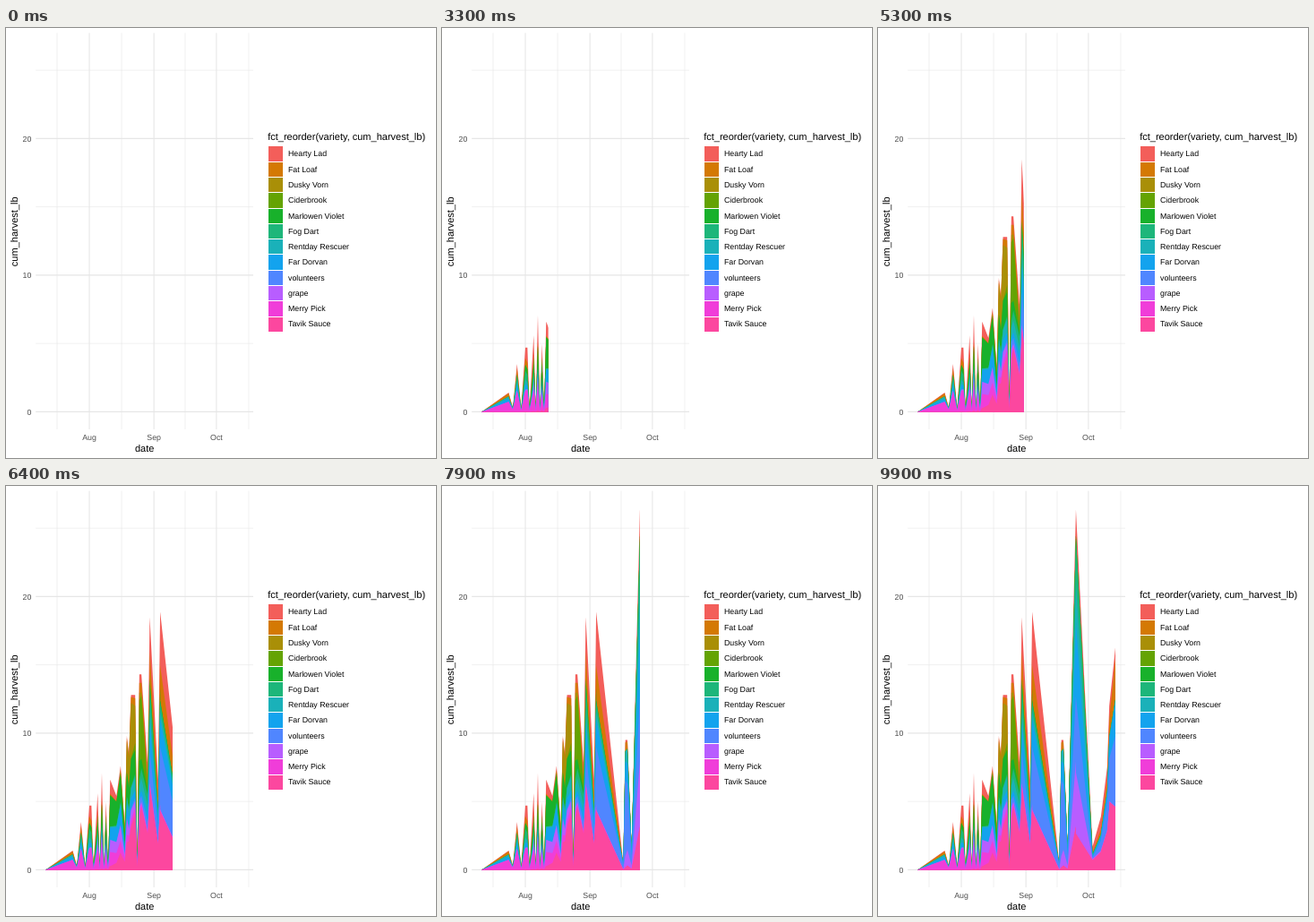
Animation of 480 by 480 pixels, one loop 10000 ms. Source, as an HTML page with a canvas:

```html
<!DOCTYPE html>
<html lang="en">
<head>
<meta charset="utf-8">
<title>Cumulative harvest</title>
<style>
  html, body { margin: 0; width: 100%; height: 100%; overflow: hidden; background: #fff; }
  canvas, svg { position: absolute; left: 0; top: 0; width: 480px; height: 480px; }
  text {
    font-family: "Liberation Sans", Arial, sans-serif; font-size: 11px; fill: #000;
    text-rendering: geometricPrecision;
  }
  .tick { font-size: 8.8px; fill: #4d4d4d; }
  .key { font-size: 8.8px; }
  .mid { text-anchor: middle; }
  .end { text-anchor: end; }
</style>
</head>
<body>
<canvas id="plot"></canvas>
<svg id="labels" viewBox="0 0 480 480"></svg>
<script>
const SIZE = 480, STEP = 100, STEPS = 100, DAYS = 95, NEVER = 999;
const PANEL = { left: 33.2, right: 276, top: 5.5, bottom: 448 };
const BASE = 429;
const px = day => 44.2 + day * 2.3255;
const py = lb => 428.4 - lb * 15.25;
const keyTop = i => Math.round(132.45 + i * 17.28);

// Top of the stack first: name, colour, weight, first peak day, spread, days until the next peak
const KINDS = [
  ['Hearty Lad', '#f35e5a', .2, 25, 8, 30],
  ['Fat Loaf', '#d47904', .13, 13, 12, 42],
  ['Dusky Vorn', '#a98f07', .3, 41, 3, NEVER],
  ['Ciderbrook', '#64a303', .35, 46, 2, NEVER],
  ['Marlowen Violet', '#18b12b', .22, 34, 11, NEVER],
  ['Fog Dart', '#1db67a', .12, 21, 5, 29],
  ['Rentday Rescuer', '#1ab1b9', .07, 16, 10, 30],
  ['Far Dorvan', '#13a3ee', .13, 15, 8, 20],
  ['volunteers', '#5086ff', .4, 64, 12, 36],
  ['grape', '#b85dff', .1, 34, 9, 42],
  ['Merry Pick', '#f03dd9', .6, 0, 25, NEVER],
  ['Tavik Sauce', '#fc479f', .35, 48, 11, 41]
];

// Each burst climbs from a low to a crest: start day, crest day, crest, low, days held
const BURSTS = [
  [0, 13, 1.4, 0],
  [15, 17, 3.5],
  [19, 21, 4.7, .3, 1],
  [23, 25, 5.6],
  [26, 27, 7.1],
  [28, 29, 5],
  [30, 31, 6.6],
  [34, 36, 7.6, 5.4],
  [38, 39, 9.8, 3.2],
  [40, 41, 12.8, 8.4, 2],
  [44, 45, 14.3, .8, 1],
  [49, 50, 18.5, 7.7],
  [54, 55, 18.9, 6.6],
  [68, 69, 9.5, .5, 1],
  [72, 76, 26.35, 1.8],
  [84, 88, 3.9, 1.7],
  [91, 92, 12, 7.5],
  [95, 95, 16.35, 16.35]
];

let seed = 7;
function random() {
  seed = (seed * 16807) % 2147483647;
  return seed / 2147483647;
}

// Bell around the first peak, repeated after every cycle
function yieldOf([, , weight, peak, spread, cycle], day) {
  let gap = day - peak;
  if (gap > 0) {
    gap %= cycle;
    gap = Math.min(gap, cycle - gap);
  }
  return weight * Math.exp(-((gap / spread) ** 2)) * (.75 + .5 * random());
}

const totals = BURSTS.flatMap(([start, crest, lb, low = .3, hold = 0]) =>
  [[start, low], [crest, lb], [crest + hold, lb]]);

// Upper edge of every kind at each key day
const tops = totals.map(([day, total]) => {
  const parts = KINDS.map(kind => yieldOf(kind, day));
  const sum = parts.reduce((a, b) => a + b, 0);
  let level = total;
  return parts.map(part => {
    const top = level;
    level -= part / sum * total;
    return top;
  });
});

const areas = KINDS.map((kind, i) => {
  const path = new Path2D();
  path.moveTo(px(0), BASE);
  totals.forEach(([day], n) => path.lineTo(px(day), py(tops[n][i])));
  path.lineTo(px(DAYS), BASE);
  path.closePath();
  return path;
});

const canvas = document.getElementById('plot');
const ctx = canvas.getContext('2d');
const ratio = window.devicePixelRatio || 1;
canvas.width = canvas.height = SIZE * ratio;
ctx.scale(ratio, ratio);

function line(x1, y1, x2, y2, width) {
  ctx.lineWidth = width;
  ctx.beginPath();
  ctx.moveTo(x1, y1);
  ctx.lineTo(x2, y2);
  ctx.stroke();
}

function drawGrid() {
  const { left, right, top, bottom } = PANEL;
  const rows = (list, w) => list.forEach(v => line(left, py(v), right, py(v), w));
  const cols = (list, w) => list.forEach(d => line(px(d), top, px(d), bottom, w));
  ctx.strokeStyle = '#e6e6e6';
  rows([5, 15, 25], .6);
  cols([5.5, 36.5, 67, 97.5], .6);
  rows([0, 10, 20], 1.07);
  cols([21, 52, 82], 1.07);
}

function drawKeys() {
  KINDS.forEach(([, color], i) => {
    ctx.fillStyle = color;
    ctx.fillRect(293, keyTop(i), 16, keyTop(i + 1) - keyTop(i) - 1);
  });
}

function draw(day) {
  ctx.fillStyle = '#fff';
  ctx.fillRect(0, 0, SIZE, SIZE);
  drawGrid();
  drawKeys();
  if (!day) return;
  ctx.save();
  ctx.beginPath();
  ctx.rect(0, 0, px(day), SIZE);
  ctx.clip();
  areas.forEach((path, i) => {
    ctx.fillStyle = KINDS[i][1];
    ctx.fill(path);
  });
  ctx.restore();
}

const labels = document.getElementById('labels');
function label(str, x, y, cls = '', turn = 0) {
  const el = document.createElementNS(labels.namespaceURI, 'text');
  el.textContent = str;
  el.setAttribute('class', cls);
  el.setAttribute('transform', `translate(${x} ${y}) rotate(${turn})`);
  labels.append(el);
}

[0, 10, 20].forEach(v => label(v, 28.3, py(v) + 3.3, 'tick end'));
[['Aug', 21], ['Sep', 52], ['Oct', 82]].forEach(([m, d]) => label(m, px(d), 460, 'tick mid'));
label('date', 154.6, 473, 'mid');
label('cum_harvest_lb', 12.8, 227.3, 'mid', -90);
label('fct_reorder(variety, cum_harvest_lb)', 292.2, 125);
KINDS.forEach(([name], i) => label(name, 315, 143.4 + i * 17.28, 'key'));

const start = performance.now();
function tick() {
  const step = Math.floor((performance.now() - start) / STEP) % STEPS;
  draw(Math.round(step * DAYS / (STEPS - 1)));
  requestAnimationFrame(tick);
}
tick();
</script>
</body>
</html>
```
